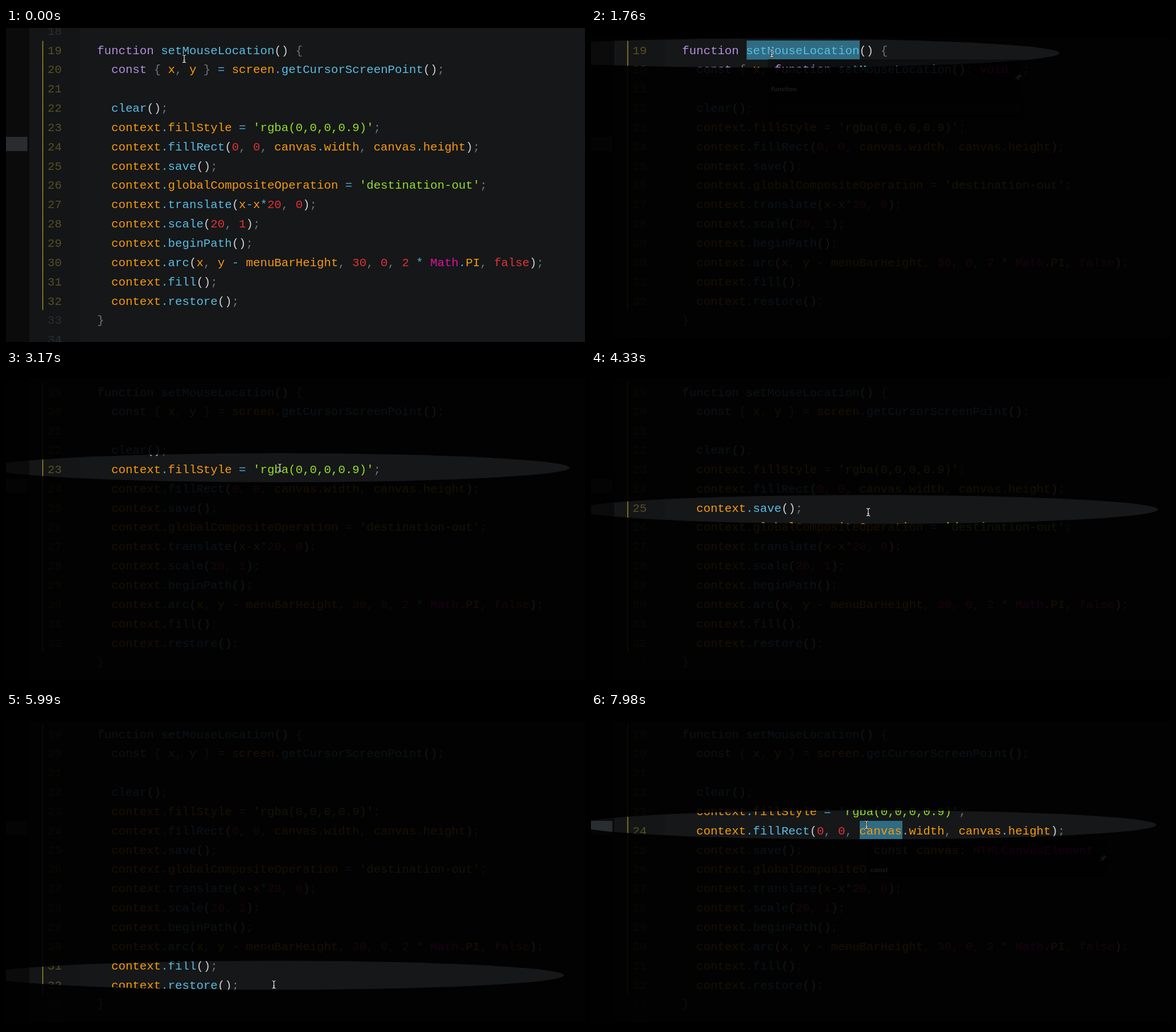
An HTML page with a canvas for the animation above (8000 ms loop, 1017 by 551 pixels).

```html
<!DOCTYPE html>
<html lang="en">
<head>
<meta charset="utf-8">
<title>Code spotlight</title>
<style>
html, body { margin: 0; width: 100%; height: 100%; overflow: hidden; background: #000; }
canvas { display: block; }
</style>
</head>
<body>
<canvas id="stage" width="1017" height="551"></canvas>
<script>
const W = 1017, H = 551, LOOP = 8000;
const ctx = document.getElementById('stage').getContext('2d');
const MONO = '20.75px "Liberation Mono", "Courier New", monospace';
const LABEL = 'bold 11px Inter, "Open Sans", sans-serif';
const PITCH = 12.45, CODE_X = 160.1, BASE_Y = 45.5, LINE_H = 33.85;
const STEP = 118, FIRST_STEP = 1614, CURSOR_LEAD = 110;
const PANEL = '#0d0e0f', SELECTED = '#2f6c83';

const CODE = `function setMouseLocation() {
  const { x, y } = screen.getCursorScreenPoint();

  clear();
  context.fillStyle = 'rgba(0,0,0,0.9)';
  context.fillRect(0, 0, canvas.width, canvas.height);
  context.save();
  context.globalCompositeOperation = 'destination-out';
  context.translate(x-x*20, 0);
  context.scale(20, 1);
  context.beginPath();
  context.arc(x, y - menuBarHeight, 30, 0, 2 * Math.PI, false);
  context.fill();
  context.restore();
}`.split('\n');

// Token classes, tried in order
const RULES = [
  [/^'/, '#98dc28'],
  [/^(function|const)$/, '#b48edb'],
  [/^(Math|void|HTMLCanvasElement)$/, '#e0109c'],
  [/^(\d+|false)$/, '#e03236'],
  [/^[a-z]+\($/i, '#5abce0'],
  [/^[a-z]+$/i, '#f79a0c'],
  [/^[()]$/, '#cfd0d0'],
  [/^[=*.-]$/, '#52abc8'],
  [/./, '#717476']
];
const TOKEN = /'[^']*'|[A-Za-z]+|\d+|\S/g;

// Turning points of the pointer
const PATH = [
  { t: 1780, x: 314, y: 44 },
  { t: 2350, x: 438, y: 60 },
  { t: 3110, x: 481, y: 171.5 },
  { t: 3260, x: 481, y: 171.5 },
  { t: 4090, x: 486, y: 239 },
  { t: 4420, x: 487, y: 248 },
  { t: 4600, x: 487, y: 277 },
  { t: 5400, x: 483, y: 354 },
  { t: 5980, x: 471, y: 462 },
  { t: 6350, x: 470, y: 503 },
  { t: 6925, x: 486, y: 303 },
  { t: 7650, x: 484, y: 198 }
];

function slope(i, key) {
  const a = PATH[i], b = PATH[i + 1];
  return a && b ? (b[key] - a[key]) / (b.t - a.t) : 0;
}

// Harmonic mean keeps the curve from overshooting
function tangent(i, key) {
  const p = slope(i - 1, key), q = slope(i, key);
  return p * q > 0 ? 2 * p * q / (p + q) : 0;
}

function along(time, key) {
  const last = PATH.length - 1;
  const t = Math.max(PATH[0].t, Math.min(PATH[last].t, time));
  const i = Math.max(1, PATH.findIndex(p => p.t >= t)) - 1;
  const a = PATH[i], b = PATH[i + 1], span = b.t - a.t;
  const u = (t - a.t) / span, v = 1 - u;
  return v * v * (1 + 2 * u) * a[key] + u * u * (3 - 2 * u) * b[key]
    + span * u * v * (v * tangent(i, key) - u * tangent(i + 1, key));
}

const pointAt = t => [along(t, 'x'), along(t, 'y')];
const stepTime = t => FIRST_STEP + Math.floor((t - FIRST_STEP) / STEP) * STEP;

function rect(x, y, w, h, color) {
  ctx.fillStyle = color;
  ctx.fillRect(x, y, w, h);
}

function text(str, x, y, color, font = MONO) {
  ctx.font = font;
  ctx.fillStyle = color;
  ctx.fillText(str, x, y);
}

function codeLine(line, x, y) {
  for (const m of line.matchAll(TOKEN)) {
    const word = m[0], next = line[m.index + word.length];
    const probe = next === '(' && word.length > 1 ? word + '(' : word;
    const color = RULES.find(r => r[0].test(probe))[1];
    text(word, x + m.index * PITCH, y, color);
  }
}

function background() {
  rect(0, 0, W, H, '#151719');
  rect(41, 0, 89, H, '#131517');
  rect(0, 0, 41, H, '#0b0b0c');
  rect(0, 191, 37.5, 25, '#2a2d2f');
  rect(63.8, 22.5, 1.5, 472.5, '#a18a25');
}

function codeLines() {
  for (let n = 18; n <= 34; n++) {
    const y = BASE_Y + (n - 19) * LINE_H;
    text(n, 73, y, n > 18 && n < 33 ? '#574f22' : '#2b2e30');
    codeLine(CODE[n - 19] || '', CODE_X, y);
  }
}

function pin(x, y) {
  ctx.save();
  ctx.translate(x, y);
  ctx.rotate(Math.PI / 4);
  rect(-3.5, -6, 7, 1.8, '#d8d8d8');
  rect(-2, -5, 4, 5, '#d8d8d8');
  rect(-4, 0, 8, 2, '#d8d8d8');
  rect(-0.6, 2, 1.2, 5, '#d8d8d8');
  ctx.restore();
}

function tooltip(x, y, right, h, code, kind) {
  rect(x, y, right - x, h, PANEL);
  codeLine(code, x + 11.5, y + 24);
  text(kind, x + 6, y + 55.5, '#fff', LABEL);
  pin(right - 6, y + 32);
}

function spotlight([x, y]) {
  ctx.beginPath();
  ctx.rect(0, 0, W, H);
  ctx.ellipse(x, y, 509, 25.4, 0, 0, 2 * Math.PI);
  ctx.fillStyle = 'rgba(0,0,0,0.9)';
  ctx.fill('evenodd');
  rect(0, 0, W, 16, '#000');
  rect(0, 545, W, 6, '#000');
}

function cursor([x, y]) {
  ctx.beginPath();
  for (const s of [-1, 1]) {
    ctx.moveTo(x - 3, y + s * 6.5);
    ctx.quadraticCurveTo(x, y + s * 6.5, x, y + s * 4.5);
    ctx.quadraticCurveTo(x, y + s * 6.5, x + 3, y + s * 6.5);
  }
  ctx.moveTo(x, y - 5);
  ctx.lineTo(x, y + 5);
  ctx.moveTo(x - 1.5, y + 2.5);
  ctx.lineTo(x + 1.5, y + 2.5);
  for (const [width, color] of [[2.8, '#111'], [1.2, '#f2f2f2']]) {
    ctx.lineWidth = width;
    ctx.strokeStyle = color;
    ctx.stroke();
  }
}

function draw(t) {
  const hoverName = t >= 210 && t < 2460, hoverCanvas = t >= 7980;
  background();
  if (t >= 210 && t < 2000) rect(273.3, 22, 198.7, 33.5, SELECTED);
  if (hoverCanvas) rect(472, 191, 75, 32, SELECTED);
  codeLines();
  if (hoverName) {
    tooltip(310.5, 55, 756, 67, 'function setMouseLocation(): void', 'function');
    if (t >= 960) rect(310.5, 122, 449, 38, PANEL);
    if (t >= 1430) rect(325, 132, 430, 18, '#17191a');
  }
  if (hoverCanvas) tooltip(485, 225, 905, 62, 'const canvas: HTMLCanvasElement', 'const');
  const now = stepTime(t);
  if (t >= 1200) spotlight(pointAt(now));
  cursor(t < 210 ? [313, 54] : pointAt(now + CURSOR_LEAD));
}

const start = performance.now();
function frame() {
  draw((performance.now() - start) % LOOP);
  requestAnimationFrame(frame);
}
frame();
</script>
</body>
</html>
```
